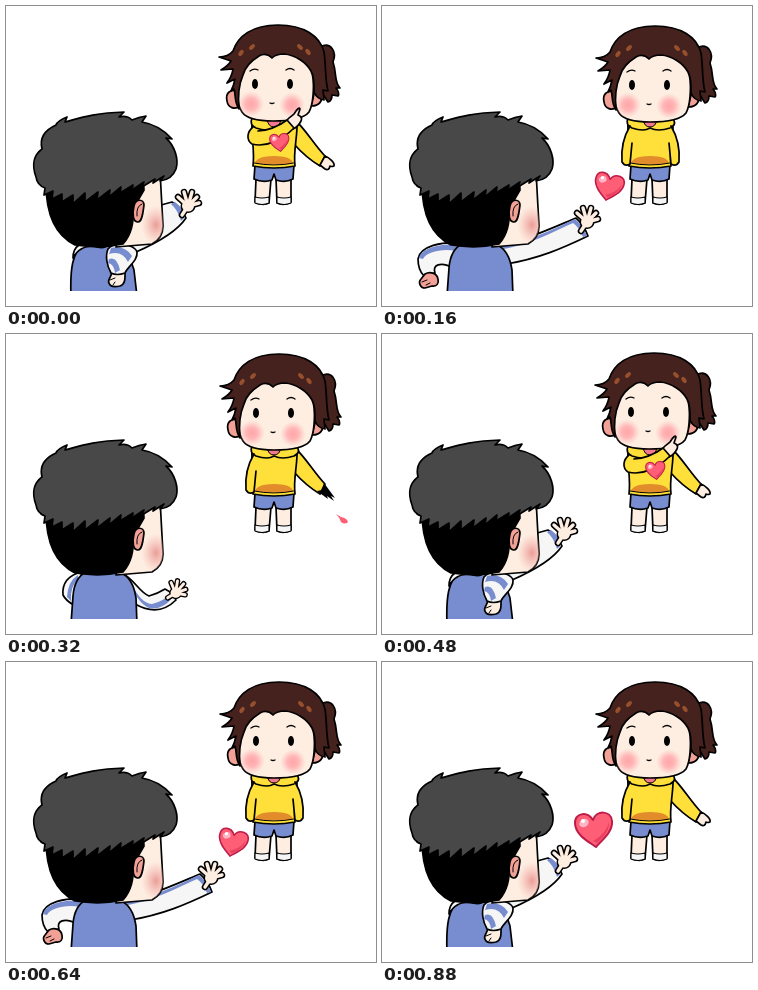
An HTML page for the animation above (960 ms loop, 370 by 300 pixels).

```html
<!DOCTYPE html>
<html lang="en">
<head>
<meta charset="utf-8">
<title>Hearts away</title>
<style>
html, body { margin: 0; width: 100%; height: 100%; overflow: hidden; background: #fff; }
svg { display: block; width: 100%; height: 100%; }
.pose { visibility: hidden; animation: show 480ms step-end infinite; animation-delay: calc(var(--i) * 80ms - 480ms); }
@keyframes show { 0% { visibility: visible; } 16.6666%, 100% { visibility: hidden; } }
.ink { stroke: #000; stroke-width: 1.7; stroke-linejoin: round; stroke-linecap: round; }
.skin { fill: #feeee2; }
.ear { fill: #f2a196; }
.white { fill: #f6f6f6; }
.blue { fill: #788cd0; }
.yellow { fill: #ffe03a; }
.hair { fill: #45221d; }
.line { fill: none; }
.flat { stroke: none; }
</style>
</head>
<body>
<svg viewBox="0 0 370 300">
<defs>
  <radialGradient id="blush">
    <stop offset="0" stop-color="#ffa5a8"/>
    <stop offset=".45" stop-color="#ffadaf" stop-opacity=".85"/>
    <stop offset="1" stop-color="#ffc0be" stop-opacity="0"/>
  </radialGradient>
  <radialGradient id="boyBlush">
    <stop offset="0" stop-color="#eb9c98"/>
    <stop offset="1" stop-color="#f4b8b0" stop-opacity="0"/>
  </radialGradient>
  <clipPath id="floor"><path d="M0 0H370V285H0Z"/></clipPath>
  <clipPath id="cheek"><path d="M110 241L146 238Q157 232 157 220L154 165H118Z"/></clipPath>

  <!-- heart, 38 wide, centred -->
  <g id="heart">
    <path d="M3 18C-4 13-18 6-18-6C-18-15-7-19 0-9C3-19 18-19 19-8C20 3 9 11 3 18Z" fill="#ff5f76" stroke="#bd1c48" stroke-width="2" stroke-linejoin="round"/>
    <path d="M4 14C11 8 17 1 16-8C15 0 9 7 0 12Z" fill="#ea3f60"/>
    <ellipse cx="-9" cy="-6" rx="5" ry="4" fill="#ffb6c6" transform="rotate(-35 -9 -6)"/>
    <circle cx="-10" cy="-8" r="2" fill="#fff"/>
  </g>
  <path id="scrap" d="M330 180L335 183Q341 184 342 188Q339 191 335 188Q334 184 330 180Z" fill="#ff5f76"/>

  <!-- open hand, centred on the palm -->
  <path id="fingers" d="M-6 13L0 4L-10-5M0 4L-4-10M0 4L4-10M0 4L9-5M0 4L11 1"/>
  <g id="hand" stroke-linecap="round" stroke-linejoin="round" fill="none">
    <use href="#fingers" stroke="#000" stroke-width="6.5"/>
    <ellipse cx="0" cy="4" rx="7.5" ry="7" fill="#000"/>
    <use href="#fingers" stroke="#feeee2" stroke-width="3.4"/>
    <ellipse cx="0" cy="4" rx="6" ry="5.5" fill="#feeee2"/>
  </g>

  <g id="boyHead" class="ink">
    <path class="skin" d="M110 241L146 238Q157 232 157 220L154 165H118Z"/>
    <ellipse class="flat" cx="150" cy="219" rx="15" ry="20" fill="url(#boyBlush)" clip-path="url(#cheek)"/>
    <path d="M40 178C40 204 47 228 69 239Q95 243 117 238C125 229 128 216 127 203L138 184L137 170L60 165Z"/>
    <path class="ear" d="M128 200C130 192 138 193 138 199C137 207 136 216 132 216C127 216 126 208 128 200Z"/>
    <path class="line" d="M131 210Q130 200 136 198" stroke-width="1"/>
    <path fill="#484848" d="M30 171C25 157 28 149 36 143C33 131 39 124 50 119C51 116 56 113 61 111L59 116C74 112 88 107 118 106L113 111Q121 109 126 114Q133 111 140 110L136 116C148 118 159 125 166 133L160 132C169 140 173 154 170 163C167 171 162 174 154 175L158 170L147 177L149 173L136 181L138 176L126 184L127 179L114 187L115 181L103 191L104 184L91 194L92 186L79 196L79 187L67 198L67 189L56 196L56 188L46 193L47 185L38 189L39 182Q31 179 30 171Z"/>
  </g>

  <g id="boyThrow" class="ink">
    <path class="white" d="M120 243L155 199L166 196Q176 202 180 212C172 224 153 236 130 246Z"/>
    <path class="flat blue" d="M165 198L169 196Q177 202 179 211L175 215Q172 204 165 198Z"/>
    <path class="blue" d="M65 290C64 264 66 246 78 238L120 240L128 264L131 290Z"/>
    <path class="white" d="M67 252Q67 243 73 239L103 238Q98 244 88 240Q73 240 67 252Z"/>
    <path class="skin" d="M106 266L119 264C119 271 120 278 114 280C109 281 104 281 103 277C101 274 105 272 106 266Z"/>
    <path class="line" d="M104 274L109 272M107 279L109 276" stroke-width="1"/>
    <path class="white" d="M102 243C109 235 128 238 131 246C132 255 122 260 119 267Q111 270 105 267C101 260 99 250 102 243Z"/>
    <path class="flat blue" d="M105 242Q119 239 126 250L122 256Q116 244 103 248ZM103 253Q111 250 114 264L109 267Q108 258 102 257Z"/>
  </g>

  <g id="boyReach" class="ink">
    <path class="white" d="M80 237C60 235 38 240 36 253C36 261 38 266 42 270L53 267C50 259 58 255 72 262Z"/>
    <path class="flat blue" d="M78 239C58 237 40 242 37 252L41 253C44 246 61 242 74 245Z"/>
    <path class="ear" d="M43 268C48 265 55 267 56 273C57 277 55 281 50 280L43 282C38 282 36 276 39 273Z"/>
    <path class="line" d="M40 276L45 274M44 279L48 277" stroke-width="1"/>
    <path class="white" d="M114 240C142 235 170 222 194 212Q202 219 206 230C181 242 156 253 124 258Z"/>
    <path class="flat blue" d="M118 240C145 236 172 223 193 213Q201 220 205 230L201 231Q197 221 191 217C171 226 146 239 122 243Z"/>
    <use href="#vest"/>
  </g>

  <g id="boyWind" class="ink">
    <path class="white" d="M76 238C63 241 56 249 57 261Q60 267 68 271Z"/>
    <path class="flat blue" d="M72 241Q62 247 61 263L65 267Q64 252 72 246Z"/>
    <path class="white" d="M116 239C128 245 134 259 143 262Q151 260 159 255Q167 259 170 266C158 278 145 279 129 270Z"/>
    <path class="flat blue" d="M119 243C129 254 134 269 146 270Q158 267 164 260L167 263C159 273 149 277 141 273C132 268 128 256 120 249Z"/>
    <use href="#vest"/>
  </g>
  <path id="vest" class="ink blue" d="M65 290L67 262C68 249 72 242 80 238L115 239Q127 244 130 264L131 290"/>

  <g id="girlHead">
    <g class="ink">
      <path class="hair" d="M315 42C326 36 332 47 328 57C332 69 329 77 335 83L331 83Q335 88 333 91L327 90Q327 96 323 97L317 88Z"/>
      <path class="ear" d="M233 87C226 83 220 88 222 96C223 103 230 105 235 101Z"/>
      <path class="ear" d="M309 89C315 86 318 90 316 96C314 100 311 101 306 101Z"/>
      <path class="skin" d="M233 66C232 85 231 98 237 107Q243 116 268 116Q297 116 304 107C309 98 309 82 308 66L290 42H245Z"/>
    </g>
    <circle cx="246" cy="99" r="13" fill="url(#blush)"/>
    <circle cx="287" cy="100" r="13" fill="url(#blush)"/>
    <g class="ink">
      <path class="hair" d="M234 104C229 97 231 90 229 84L226 86Q229 80 230 74L222 78Q227 71 228 64L216 65Q223 61 226 56L214 52Q223 52 228 46C233 31 247 20 273 20C299 20 315 31 319 47C321 60 320 75 323 86L318 85L319 95Q312 94 309 87C309 78 309 72 306 66C301 57 290 50 279 49Q271 49 267 53Q261 47 254 51C246 56 240 62 238 70Q232 84 234 104Z"/>
      <path class="line" d="M245 66Q249 63 253 65M281 65Q285 62 289 65M265 98Q267 99 269 98" stroke-width="1.3"/>
    </g>
    <ellipse cx="250" cy="79" rx="3" ry="5"/>
    <ellipse cx="285" cy="79" rx="3" ry="5"/>
    <g fill="#96502e">
      <ellipse cx="236" cy="48" rx="3.5" ry="2" transform="rotate(-55 236 48)"/>
      <ellipse cx="247" cy="42" rx="3.5" ry="2" transform="rotate(-45 247 42)"/>
      <ellipse cx="295" cy="42" rx="3.5" ry="2" transform="rotate(45 295 42)"/>
      <ellipse cx="303" cy="47" rx="3.5" ry="2" transform="rotate(55 303 47)"/>
    </g>
  </g>

  <g id="girlBody" class="ink">
    <path class="skin" d="M250 173L249 196Q256 200 263 197L265 173ZM270 173L271 197Q278 200 285 196L285 173Z"/>
    <path class="white" d="M249 191Q256 193 263 191V197Q256 200 249 197ZM271 191Q278 193 285 191V197Q278 200 271 197Z" stroke-width="1.1"/>
    <path class="blue" d="M249 159L248 173Q257 177 266 174L268 168L270 174Q279 177 287 173L288 159Z"/>
    <path class="yellow" d="M246 114C245 130 249 145 247 160Q268 164 289 160C287 144 292 130 291 114Z"/>
    <path class="flat" d="M249 157Q251 150 268 150Q285 150 287 157Q268 160 249 157Z" fill="#e38c2c"/>
    <path class="line" d="M248 157Q268 161 288 157" stroke-width="1"/>
    <path class="yellow" d="M246 112Q243 119 250 122Q262 126 268 122Q276 126 288 122Q296 118 290 112Z"/>
    <path d="M261 113H275Q274 121 268 121Q262 121 261 113Z" fill="#f2788f" stroke-width="1"/>
  </g>
  <path id="armDown" class="ink yellow" d="M248 120C242 130 239 144 240 156Q243 161 248 158L250 137"/>
  <path id="armOut" class="ink yellow" d="M290 115C300 124 309 140 319 150L314 160C304 154 295 146 288 138"/>
  <path id="palmOut" class="ink skin" d="M319 150C324 152 329 157 328 160Q325 161 324 160Q323 165 319 163L314 159Z"/>
  <path id="smear" d="M318 149L329 164L325 162L328 167L321 162L322 165L311 157L316 156Z"/>
  <g id="armRight"><use href="#armDown" transform="matrix(-1 0 0 1 537 0)"/></g>
  <g id="swipe"><use href="#armOut"/><use href="#smear"/><use href="#scrap"/></g>
</defs>

<g clip-path="url(#floor)">
  <!-- backhand ready -->
  <g class="pose" style="--i:0">
    <use href="#armOut"/><use href="#palmOut"/>
    <use href="#girlBody"/>
    <use href="#girlHead" x="-1" y="-1"/>
    <g class="ink">
      <path class="skin" d="M281 119C279 113 285 111 288 108Q293 100 294 103L292 109Q297 111 295 115Q292 121 287 123Z"/>
      <path class="yellow" d="M247 121C241 126 240 134 246 138C261 142 277 133 288 122L281 114C272 121 260 125 252 125"/>
    </g>
    <use href="#heart" transform="translate(273 136) scale(.52)"/>
    <use href="#boyThrow"/><use href="#hand" transform="translate(182 196)"/>
  </g>

  <!-- backhand swipe -->
  <g class="pose" style="--i:1">
    <use href="#swipe" transform="matrix(-1 0 0 1 537 0)"/>
    <use href="#girlBody"/><use href="#armRight"/>
    <use href="#girlHead"/>
    <use href="#boyWind"/><use href="#hand" transform="translate(171 256) rotate(25) scale(.85)"/>
  </g>

  <!-- second throw -->
  <g class="pose" style="--i:2">
    <use href="#girlBody"/>
    <use href="#armDown"/><use href="#armRight"/>
    <use href="#girlHead"/>
    <use href="#heart" transform="translate(226 180) rotate(18) scale(.78)"/>
    <use href="#boyReach"/><use href="#hand" transform="translate(205 212)"/>
  </g>

  <!-- forehand ready -->
  <g class="pose" style="--i:3">
    <use href="#girlBody"/>
    <use href="#armDown"/>
    <path class="ink yellow" d="M289 117C297 122 303 133 305 142Q304 149 295 149C288 148 281 140 276 130L285 126L291 133"/>
    <use href="#girlHead" x="-1" y="-2"/>
    <use href="#heart" transform="translate(267 141) scale(.68)"/>
    <path d="M262 122L271 124L268 120L278 124L292 126L290 132L276 130L267 127L272 127Z"/>
    <use href="#boyReach"/><use href="#hand" transform="translate(205 212)"/>
  </g>

  <!-- forehand swipe -->
  <g class="pose" style="--i:4">
    <use href="#swipe"/>
    <use href="#girlBody"/><use href="#armDown"/>
    <use href="#girlHead"/>
    <use href="#boyWind"/><use href="#hand" transform="translate(171 256) rotate(25) scale(.85)"/>
  </g>

  <!-- first throw -->
  <g class="pose" style="--i:5">
    <use href="#armOut"/><use href="#palmOut"/>
    <use href="#girlBody"/><use href="#armDown"/>
    <use href="#girlHead"/>
    <use href="#heart" transform="translate(211 167)"/>
    <use href="#boyThrow"/><use href="#hand" transform="translate(182 196)"/>
  </g>

  <use href="#boyHead"/>
</g>
</svg>
</body>
</html>
```
